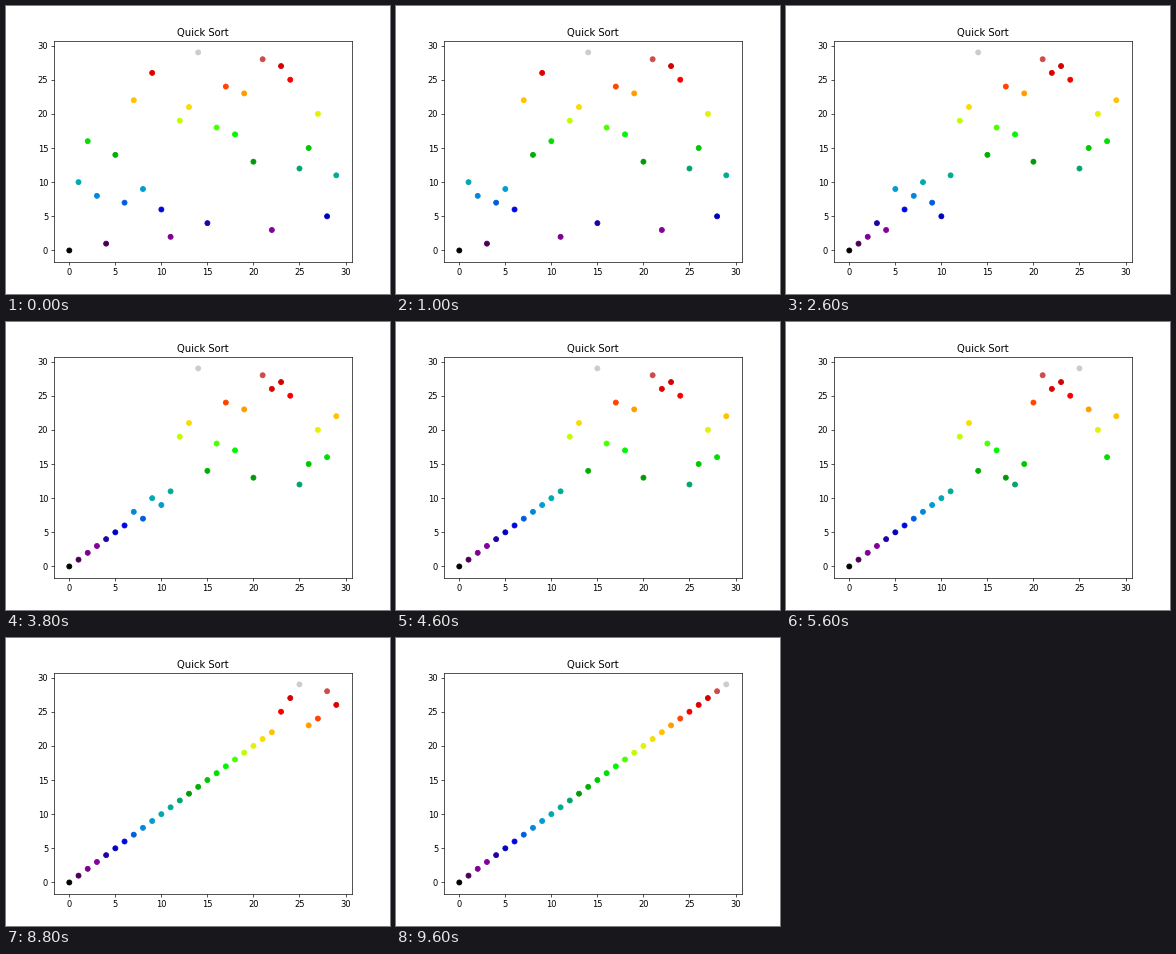
A matplotlib script for the animation above (9.8 s loop, 384 by 288 pixels).

```python
import matplotlib.pyplot as plt
import numpy as np
from matplotlib.animation import FuncAnimation

START = [0, 10, 16, 8, 1, 14, 7, 22, 9, 26, 6, 2, 19, 21, 29,
         4, 18, 24, 17, 23, 13, 28, 3, 27, 25, 12, 15, 20, 5, 11]
N = len(START)
STEP_MS = 200


def swap(a, i, j):
    a[i], a[j] = a[j], a[i]


def quick_sort(a, lo, hi):
    """Sort a[lo..hi] in place, yielding a snapshot after each swap
    below the pivot (those into slot 0 are not shown)."""
    if lo >= hi:
        return
    i = lo
    for j in range(lo, hi):
        if a[j] < a[hi]:
            swap(a, i, j)
            if i > 0:
                yield list(a)
            i += 1
    swap(a, i, hi)
    yield from quick_sort(a, lo, i - 1)
    yield from quick_sort(a, i + 1, hi)


def limits(size_px):
    """Data limits with a marker's radius and a 5% margin on both sides."""
    pad = 3 / size_px * 1.1 * N
    pad *= (N - 1) / N
    margin = 0.05 * (N - 1 + 2 * pad)
    return -pad - margin, N - 1 + pad + margin


steps = list(quick_sort(list(START), 0, N - 1))

fig, ax = plt.subplots(figsize=(6.4, 4.8), dpi=60)
dots = ax.scatter(range(N), START, c=START, cmap="nipy_spectral")
ax.set_title("Quick Sort")
ax.set_xlim(limits(496))
ax.set_ylim(limits(369.6))
ax.set_xticks(range(0, N + 1, 5))
ax.set_yticks(range(0, N + 1, 5))


def update(k):
    values = np.array(steps[k])
    dots.set_offsets(np.column_stack([np.arange(N), values]))
    dots.set_array(values)
    return (dots,)


anim = FuncAnimation(fig, update, frames=len(steps), interval=STEP_MS,
                     repeat=True, repeat_delay=0)
plt.show()
```
